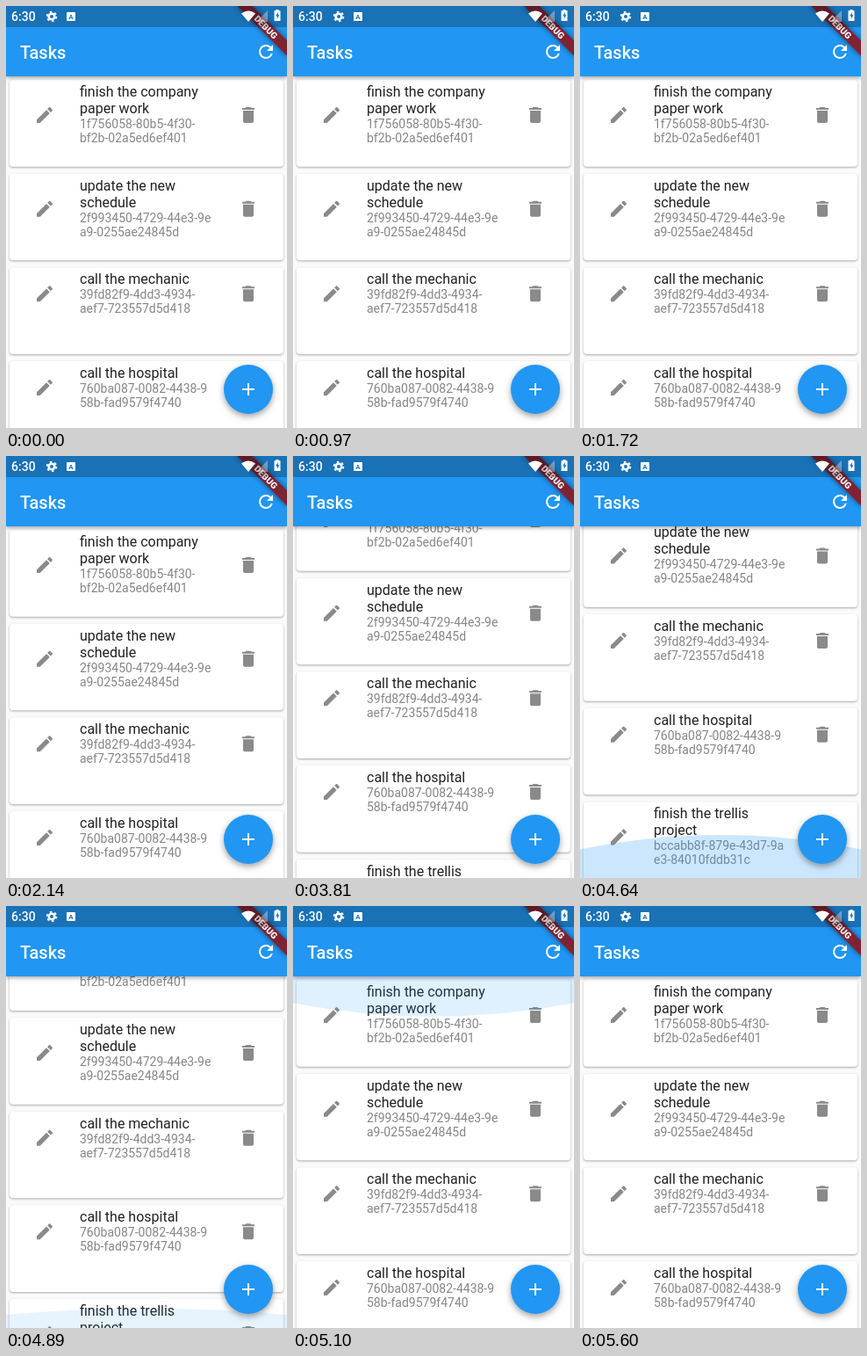
An HTML page for the animation above (5640 ms loop, 320 px wide and 480 px high).

```html
<!DOCTYPE html>
<html lang="en">
<head>
<meta charset="utf-8">
<title>Tasks</title>
<style>
  html, body { margin: 0; width: 100%; height: 100%; overflow: hidden; }
  svg { display: block; width: 320px; height: 480px; background: #fafafa; font-family: Roboto, sans-serif; }
  .card { fill: #fff; filter: drop-shadow(0 1px 1px #0005); }
  .title { font-size: 16px; fill: #212121; }
  .sub { font-size: 14px; fill: #868686; }
  .icon { fill: #8a8a8a; }
  .blue { fill: #2196f3; }
  .bar { filter: drop-shadow(0 2px 2px #0005); }
  .fab { filter: drop-shadow(0 3px 3px #0004) drop-shadow(0 2px 5px #0002); }
  .white { fill: #fff; }
  .dark { fill: #1970b6; }
</style>
</head>
<body>
<svg viewBox="0 0 320 480">
  <defs>
    <path id="edit" d="M3 17.25V21h3.75L17.81 9.94l-3.75-3.75zM20.71 7.04a1 1 0 0 0 0-1.41l-2.34-2.34a1 1 0 0 0-1.41 0l-1.83 1.83 3.75 3.75z"/>
    <path id="delete" d="M6 19c0 1.1.9 2 2 2h8c1.1 0 2-.9 2-2V7H6zM19 4h-3.5l-1-1h-5l-1 1H5v2h14z"/>
    <path id="refresh" d="M17.65 6.35A7.96 7.96 0 0 0 12 4a8 8 0 1 0 7.73 10h-2.08A6 6 0 1 1 12 6c1.66 0 3.14.69 4.22 1.78L13 11h7V4z"/>
    <path id="add" d="M19 13h-6v6h-2v-6H5v-2h6V5h2v6h6z"/>
    <clipPath id="view"><rect y="80" width="320" height="400"/></clipPath>
  </defs>

  <g clip-path="url(#view)">
    <g id="list"></g>
    <path id="topGlow" class="blue"/>
    <path id="bottomGlow" class="blue"/>
  </g>

  <circle class="blue fab" cx="276" cy="436" r="28"/>
  <use class="white" href="#add" x="264" y="424"/>

  <rect class="blue bar" width="320" height="80"/>
  <text class="white" x="16" y="60" font-size="20" font-weight="500">Tasks</text>
  <use class="white" href="#refresh" x="284" y="40"/>

  <g transform="translate(320 0) rotate(45)">
    <rect x="-40" y="28" width="80" height="12" style="filter:drop-shadow(0 0 3px #0008)" fill="#7b4b6b"/>
    <rect x="-40" y="28" width="80" height="12" fill="#7e2333"/>
    <text class="white" y="37.6" font-size="10.2" font-weight="900" text-anchor="middle">DEBUG</text>
  </g>

  <!-- The system status bar lies over everything else. -->
  <rect width="320" height="24" fill-opacity=".25"/>
  <g class="white">
    <text x="6" y="17" font-size="14" font-weight="500">6:30</text>
    <g fill="none" stroke="#fff">
      <circle cx="52" cy="12" r="3.3" stroke-width="2.6"/>
      <circle cx="52" cy="12" r="5.3" stroke-width="2" stroke-dasharray="2.5 3.05"/>
    </g>
    <rect x="69" y="7" width="10" height="10" rx="1"/>
    <text class="dark" x="74" y="15" font-size="8" font-weight="700" text-anchor="middle">A</text>
    <path d="M268 8.5q8-6 16 0L276 18z"/>
    <path d="M298 5v13h-13z" opacity=".35"/>
    <path d="M307.5 4h3v1.3h2V17h-7V5.3h2z"/>
    <path class="dark" d="M309.8 7l-2.6 4.6h1.5V15l2.6-4.8h-1.5z"/>
  </g>
</svg>
<script>
const LOOP = 5640, PITCH = 320 / 3, END = 352 / 3;
const $ = id => document.getElementById(id);

const tasks = [
  [["finish the company", "paper work"], ["1f756058-80b5-4f30-", "bf2b-02a5ed6ef401"]],
  [["update the new", "schedule"], ["2f993450-4729-44e3-9e", "a9-0255ae24845d"]],
  [["call the mechanic"], ["39fd82f9-4dd3-4934-", "aef7-723557d5d418"]],
  [["call the hospital"], ["760ba087-0082-4438-9", "58b-fad9579f4740"]],
  [["finish the trellis", "project"], ["bccabb8f-879e-43d7-9a", "e3-84010fddb31c"]]
];

const lines = (rows, cls, y, step) =>
  rows.map((row, i) => `<text class="${cls}" x="84" y="${y + i * step}">${row}</text>`).join("");

$("list").innerHTML = tasks.map(([title, id], i) => {
  const extra = (title.length - 1) * 19;
  const iconY = 18 + extra * 0.53;
  return `<g transform="translate(0 ${84 + i * PITCH})">
    <rect class="card" x="4" width="312" height="98.67" rx="4"/>
    <use class="icon" href="#edit" x="32" y="${iconY}"/>
    <use class="icon" href="#delete" x="264" y="${iconY}"/>
    ${lines(title, "title", 19, 19)}${lines(id, "sub", 36 + extra, 16)}
  </g>`;
}).join("");

// Keys are [time, value]; two keys at one time make a hard change.
const scrollKeys = [[3810, 0], [3810, 52], [3900, 52], [3900, 72], [3960, 100], [4040, END],
  [4810, END], [4810, 108], [4880, 70], [4960, 24], [5030, 0]];
const bottomKeys = [[4020, 0], [4150, 0.64], [4310, 0.64], [4640, 0.6], [4810, 0.6], [4960, 0]];
const topKeys = [[5020, 0], [5100, 0.56], [5140, 0.62], [5310, 0.62], [5600, 0]];

function track(keys, t) {
  const next = keys.findIndex(key => key[0] > t);
  if (next === 0) return keys[0][1];
  if (next < 0) return keys[keys.length - 1][1];
  const [t0, a] = keys[next - 1], [t1, b] = keys[next];
  return a + (b - a) * (t - t0) / (t1 - t0);
}

function drawGlow(id, edge, dir, size, strength) {
  const side = edge + dir * 54 * size, middle = edge + dir * 109 * size;
  $(id).setAttribute("d", `M0 ${edge}V${side}Q160 ${middle} 320 ${side}V${edge}z`);
  $(id).setAttribute("opacity", size * strength);
}

function draw(now) {
  const t = now % LOOP;
  $("list").setAttribute("transform", `translate(0 ${-track(scrollKeys, t)})`);
  drawGlow("topGlow", 80, 1, track(topKeys, t), 0.25);
  drawGlow("bottomGlow", 480, -1, track(bottomKeys, t), 0.38);
  requestAnimationFrame(draw);
}
draw(performance.now());
</script>
</body>
</html>
```
